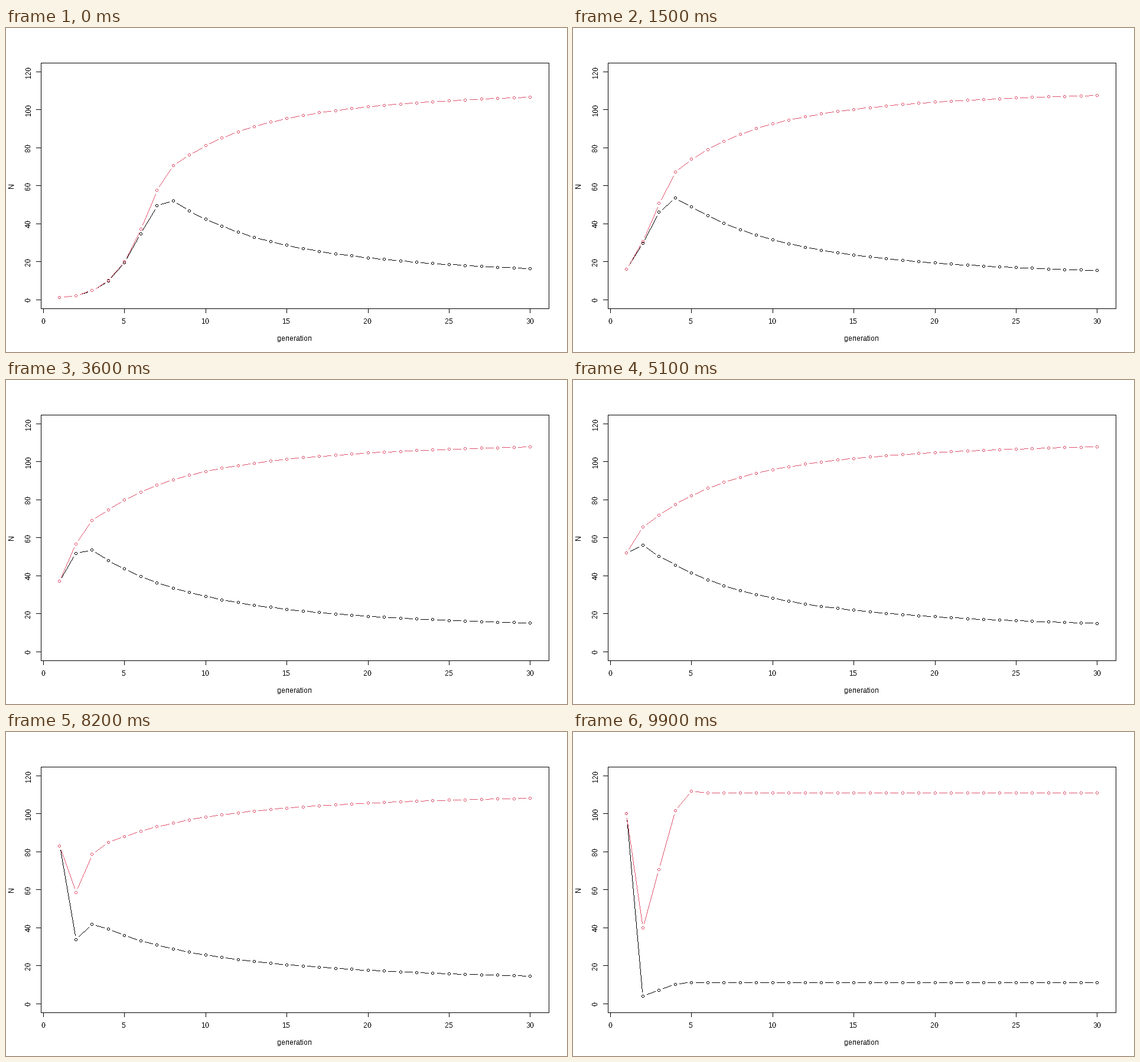
Write a matplotlib script that moves like this. It is 950 px wide and 550 px high and loops after 10000 ms.

```python
import matplotlib.pyplot as plt
import numpy as np
from matplotlib.animation import FuncAnimation
from matplotlib.collections import PolyCollection

W, H, DPI = 950, 550, 72
LEFT, RIGHT, TOP, BOTTOM = 59.04, 919.76, 59.04, 476.56
LINE = 14.4              # height of one margin line
GAP = LINE / 2           # space between a point and its line
GENERATIONS, FRAMES = 30, 100
RATE, CAPACITY, ALPHA = 1.2, np.array([100, 120]), 0.8
COLORS = ("black", "#DF536B")

plt.rcParams.update({
    "font.family": "Liberation Sans",
    "font.size": 12,
    "text.hinting": "native",
    "text.hinting_factor": 1,
    "text.antialiased": False,
})

SQUARE = np.array([(0, 0), (1, 0), (1, 1), (0, 1)])
RING = np.array([(i, j) for i in range(-2, 3) for j in range(-2, 3)
                 if 4 <= i * i + j * j <= 5])


def to_x(v):
    return LEFT + (v + 0.16) * (RIGHT - LEFT) / 31.32


def to_y(v):
    return BOTTOM - (v + 4.8) * (BOTTOM - TOP) / 129.6


def segment(a, b):
    """Pixels of a one-pixel line without smoothing."""
    a, b = np.trunc(a), np.trunc(b)
    d = b - a
    n = max(int(np.abs(d).max()), 1)
    return a + np.floor(np.outer(np.arange(n + 1) / n, d) + 0.5)


def squares(pixels):
    return pixels[:, None, :] + SQUARE


def compete(start):
    """Discrete Lotka-Volterra competition of two species."""
    n = np.array([start, start], float)
    rows = [n]
    for _ in range(GENERATIONS - 1):
        n = n + RATE * n * (1 - (n + ALPHA * n[::-1]) / CAPACITY)
        rows.append(n)
    return np.array(rows).T


def curve(values):
    """Rings joined by lines that stop short of them."""
    pts = np.column_stack([to_x(np.arange(1, GENERATIONS + 1)), to_y(values)])
    parts = [np.trunc(p) + RING for p in pts]
    for a, b in zip(pts, pts[1:]):
        step = (b - a) * GAP / np.hypot(*(b - a))
        parts.append(segment(a + step, b - step))
    return squares(np.concatenate(parts))


def pixel_layer(color, z):
    layer = PolyCollection([], facecolors=color, edgecolors="none",
                           linewidths=0, antialiaseds=False, zorder=z)
    ax.add_collection(layer, autolim=False)
    return layer


def label(x, y, s, rotation=0):
    ax.text(x, y, s, ha="center", va="baseline", rotation=rotation,
            rotation_mode="anchor", color="black")


fig = plt.figure(figsize=(W / DPI, H / DPI), dpi=DPI, facecolor="white")
ax = fig.add_axes([0, 0, 1, 1])
ax.set_xlim(0, W)
ax.set_ylim(H, 0)
ax.axis("off")

corners = [(LEFT, TOP), (RIGHT, TOP), (RIGHT, BOTTOM), (LEFT, BOTTOM)]
frame_parts = [segment(np.array(a), np.array(b))
               for a, b in zip(corners, corners[1:] + corners[:1])]
for v in range(0, 31, 5):
    x = to_x(v)
    frame_parts.append(segment(np.array([x, BOTTOM]),
                               np.array([x, BOTTOM + GAP])))
    label(x - 0.5, BOTTOM + 1.8 * LINE, str(v))
for v in range(0, 121, 20):
    y = to_y(v)
    frame_parts.append(segment(np.array([LEFT, y]),
                               np.array([LEFT - GAP, y])))
    label(LEFT - 1.2 * LINE, y, str(v), 90)
label((LEFT + RIGHT) / 2, BOTTOM + 3.8 * LINE, "generation")
label(LEFT - 3.2 * LINE, (TOP + BOTTOM) / 2, "N", 90)
pixel_layer("black", 1).set_verts(squares(np.concatenate(frame_parts)))

layers = [pixel_layer(c, 2 + i) for i, c in enumerate(COLORS)]


def update(i):
    for layer, values in zip(layers, compete(i + 1)):
        layer.set_verts(curve(values))
    return layers


anim = FuncAnimation(fig, update, frames=FRAMES, interval=100,
                     repeat=True, repeat_delay=0, blit=False)
plt.show()
```
